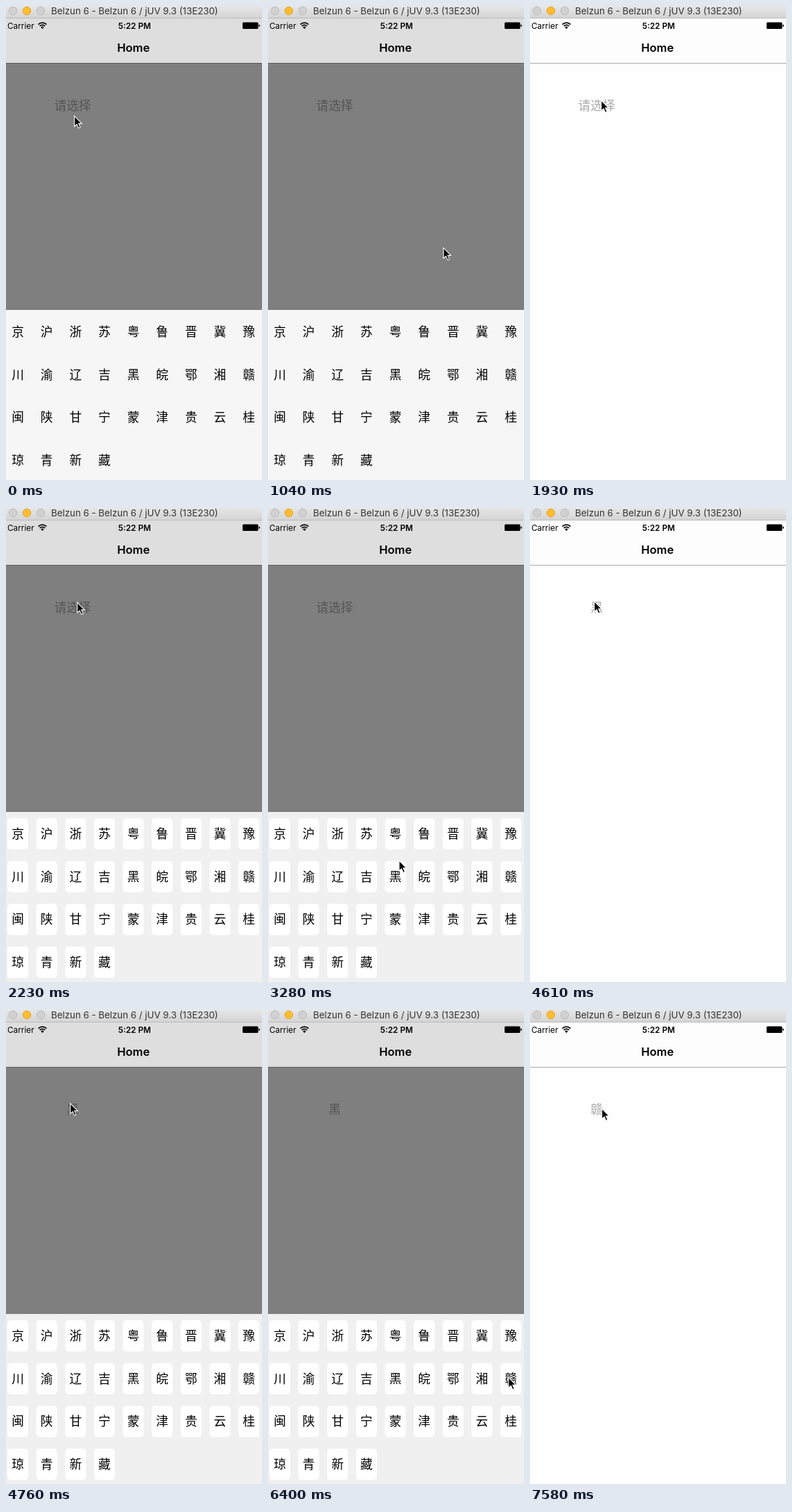
An HTML page for the animation above (8 s loop, 369x683 px).

```html
<!DOCTYPE html>
<html lang="zh-CN">
<head>
<meta charset="utf-8">
<title>Plate prefix picker</title>
<style>
  html, body { margin: 0; height: 100%; overflow: hidden; }
  svg { display: block; width: 369px; height: 683px; font-family: Inter, sans-serif; }
  .cjk { font: 17.7px "Noto Sans CJK SC", "Noto Sans CJK", sans-serif; text-anchor: middle; }
  .mid { text-anchor: middle; font-weight: 600; }
  #screen { --nav: #fdfdfd; --page: #fefefe; --line: #aaa; --label: #a9a9a9; }
  #screen.open { --nav: #dedede; --page: #7f7f7f; --line: #595959; --label: #555; }
  #nav { fill: var(--nav); }
  #page { fill: var(--page); }
  #line { fill: var(--line); }
  #label { fill: var(--label); }
  #sheet { display: none; }
  .open #sheet { display: inline; }
  .flat #keys { fill: none; }
</style>
</head>
<body>
<svg viewBox="0 0 369 683">
  <defs>
    <linearGradient id="chrome" x2="0" y2="1">
      <stop stop-color="#e6e6e6"/><stop offset="1" stop-color="#d3d3d3"/>
    </linearGradient>
  </defs>
  <g id="screen">
    <rect id="page" y="82" width="369" height="601"/>
    <rect id="nav" y="18" width="369" height="64"/>
    <rect id="line" y="82" width="369" height="1"/>
    <text id="label" class="cjk" x="96" y="149.7"></text>
    <text x="2" y="32.5" font-size="11.8">Carrier</text>
    <g fill="none" stroke="#000" stroke-width="1.7">
      <path d="M46.6 26.6a8.2 8.2 0 0 1 11.8 0M48.7 29a5.3 5.3 0 0 1 7.6 0"/>
      <path d="M50.3 30.7a3 3 0 0 1 4.4 0L52.5 33Z" fill="#000" stroke="none"/>
    </g>
    <text class="mid" x="185.3" y="32.5" font-size="11.8">5:22 PM</text>
    <rect x="341" y="23.5" width="22.5" height="9.5" rx="1.5"/>
    <path d="M364.3 26.5q1.7 .3 1.7 1.8t-1.7 1.8Z"/>
    <text class="mid" x="183.7" y="66" font-size="16.5">Home</text>
    <g id="sheet">
      <rect id="tray" y="438" width="369" height="245"/>
      <g id="keys" fill="#fff"></g>
      <g id="glyphs" class="cjk"></g>
    </g>
  </g>
  <rect width="369" height="18" fill="url(#chrome)"/>
  <rect y="17" width="369" height="1" fill="#bcbcbc"/>
  <g fill="#d1d1d1" stroke="#b9b9b9">
    <circle cx="10" cy="7" r="5.7"/>
    <circle cx="30" cy="7" r="5.7" fill="#fdbd2f" stroke="#dfa12b"/>
    <circle cx="50" cy="7" r="5.7"/>
  </g>
  <text x="65" y="12" font-size="13.3" fill="#333">Belzun 6 - Belzun 6 / jUV 9.3 (13E230)</text>
  <path id="cursor" d="M0 0V15L3.5 11.8L6 17.4L8.4 16.4L6 10.9H10.6Z" stroke="#fff" stroke-width="1.1"/>
</svg>
<script>
const LOOP = 8000;
const $ = id => document.getElementById(id);

let keys = '', glyphs = '';
[...'京沪浙苏粤鲁晋冀豫川渝辽吉黑皖鄂湘赣闽陕甘宁蒙津贵云桂琼青新藏'].forEach((char, i) => {
  const x = 17 + i % 9 * 41.63, y = 447 + Math.floor(i / 9) * 61.7;
  keys += `<rect x="${x - 15}" y="${y}" width="30" height="45" rx="5"/>`;
  glyphs += `<text x="${x}" y="${y + 29}">${char}</text>`;
});
$('keys').innerHTML = keys;
$('glyphs').innerHTML = glyphs;

// Pointer moves: first step, last step, step count, destination
const moves = [
  [150, 1040, 7, 253, 348.5],
  [1490, 1930, 4, 102.7, 136],
  [2530, 3280, 6, 189, 508],
  [3430, 3430, 1, 184.7, 525.3],
  [3880, 4610, 6, 92.7, 134.5],
  [5060, 5800, 6, 325, 564],
  [5950, 6100, 2, 336, 529.5],
  [6250, 6400, 2, 346.7, 529.5],
  [7000, 7580, 5, 103.6, 142]
];

function pointerAt(t) {
  let x = 98.6, y = 158.5;
  for (const [start, end, steps, toX, toY] of moves) {
    if (t < start) break;
    const interval = (end - start) / (steps - 1) || 1;
    const p = Math.min(steps, Math.floor((t - start) / interval + 1.001)) / steps;
    const eased = p * p * (3 - 2 * p);
    x += (toX - x) * eased;
    y += (toY - y) * eased;
  }
  return [x, y];
}

const within = (t, a, b) => t >= a && t < b;

function render(t) {
  const first = t < 1190;
  const open = first || within(t, 2230, 3580) || within(t, 4760, 6700);
  $('screen').classList.toggle('open', open);
  $('screen').classList.toggle('flat', first);
  $('tray').setAttribute('fill', first ? '#f6f6f6' : '#f0f0f0');
  $('label').textContent = t < 3580 ? '请选择' : t < 6700 ? '黑' : '赣';
  $('cursor').setAttribute('transform', `translate(${pointerAt(t)})`);
}

const origin = performance.now();
function tick() {
  render((performance.now() - origin) % LOOP);
  requestAnimationFrame(tick);
}
tick();
</script>
</body>
</html>
```
